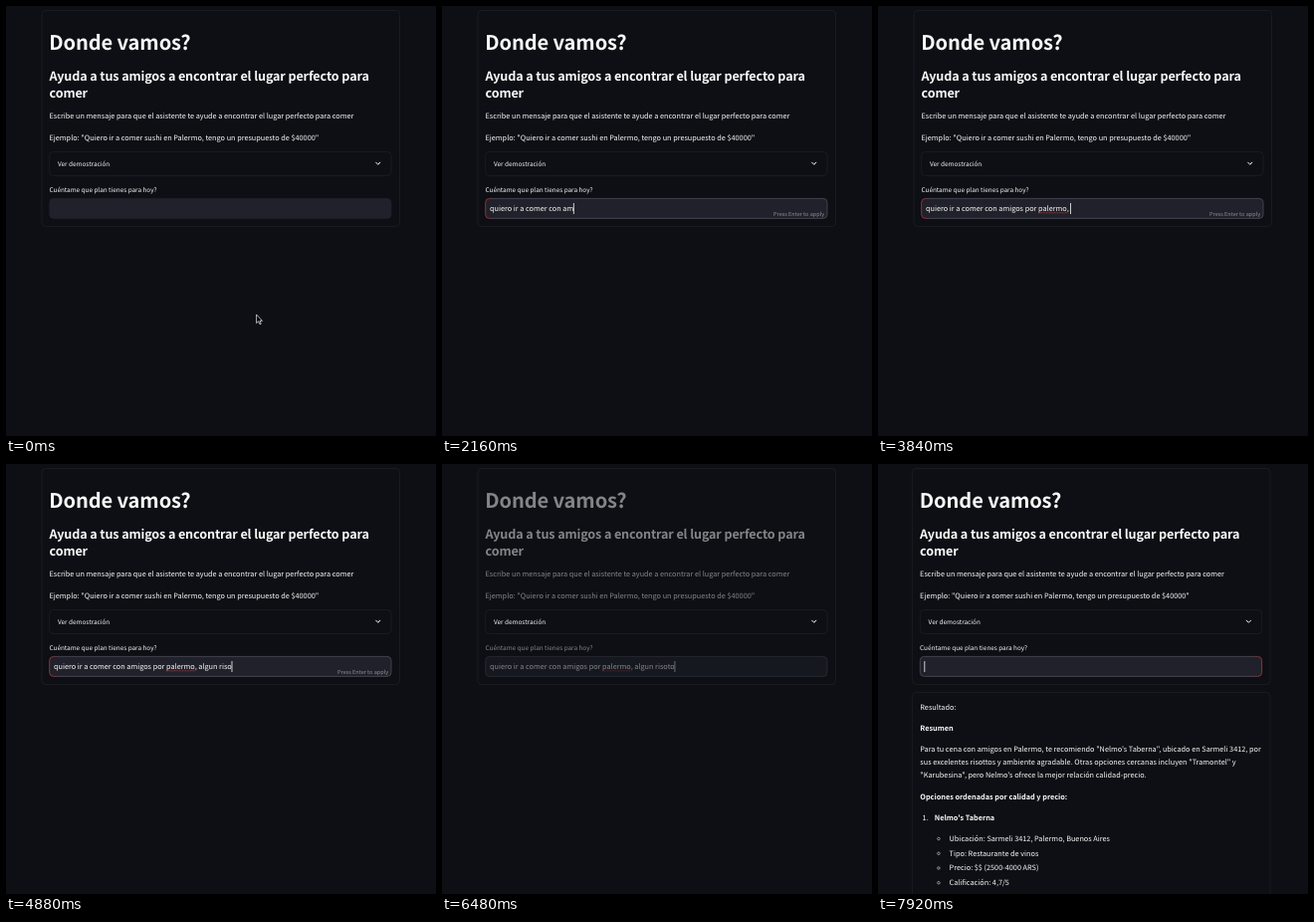
Write an HTML page that moves like this. It is 432 by 432 pixels and loops after 8000 ms.

```html
<!DOCTYPE html>
<html lang="es">
<head>
<meta charset="utf-8">
<title>Donde vamos?</title>
<style>
  html, body { margin: 0; width: 100%; height: 100%; overflow: hidden; background: #0d0f14; }
  svg { display: block; width: 432px; height: 432px; }
  text {
    font: 7.31px "Noto Sans CJK JP", "Noto Sans CJK SC", "Noto Sans CJK", "Noto Sans", sans-serif;
    fill: #fafafa; white-space: pre; text-rendering: geometricPrecision;
  }
  .h1 { font-size: 20.1px; font-weight: 700; letter-spacing: -.1px; }
  .h2 { font-size: 12.6px; font-weight: 700; letter-spacing: -.13px; }
  .label { font-size: 6.4px; }
  .bold { font-weight: 700; }
  .hint { font-size: 5.5px; fill: #8f9096; text-anchor: end; }
  .panel { fill: none; stroke: #1d1f25; stroke-width: .8; }
</style>
</head>
<body>
<svg viewBox="0 0 432 432">
  <defs>
    <linearGradient id="redLeft">
      <stop stop-color="#b5333b"/><stop offset=".03" stop-color="#4b4c58"/>
    </linearGradient>
    <linearGradient id="redRight">
      <stop offset=".97" stop-color="#4b4c58"/><stop offset="1" stop-color="#b5333b"/>
    </linearGradient>
  </defs>
  <g id="page">
    <rect class="panel" x="36" y="4.5" width="359.5" height="217" rx="4"/>
    <g id="content">
      <text class="h1" x="43.2" y="44">Donde vamos?</text>
      <text class="h2" x="43.5" y="75.2">Ayuda a tus amigos a encontrar el lugar perfecto para</text>
      <text class="h2" x="43.5" y="92.4">comer</text>
      <text x="43.5" y="113.4">Escribe un mensaje para que el asistente te ayude a encontrar el lugar perfecto para comer</text>
      <text x="43.5" y="134.6">Ejemplo: "Quiero ir a comer sushi en Palermo, tengo un presupuesto de $40000"</text>
      <text class="label" x="43.5" y="187.3">Cuéntame que plan tienes para hoy?</text>
      <rect id="field" x="43.7" y="193.4" width="343.3" height="20" rx="4" fill="#20212a" stroke-width=".8"/>
      <text id="typed" x="48" y="206"></text>
      <path id="misspelt" d="M161 207.8h29" stroke="#c0474c" stroke-width=".7" stroke-dasharray="1 .6"/>
      <path id="caret" d="M0 198v11" stroke="#fafafa" stroke-width=".8"/>
      <text id="hint" class="hint" x="384" y="210.6">Press Enter to apply</text>
    </g>
    <rect class="panel" x="43.7" y="146.5" width="343.3" height="24" rx="4"/>
    <text class="label" x="52" y="161">Ver demostración</text>
    <path d="M371.4 156.9l2.4 2.4 2.4-2.4" fill="none" stroke="#fafafa" stroke-width="1"/>
    <g id="result">
      <rect class="panel" x="36" y="229.5" width="359.5" height="230" rx="4"/>
      <text x="43.7" y="246.6">Resultado:</text>
      <text class="bold" x="43.7" y="268">Resumen</text>
      <text x="43.7" y="289.2">Para tu cena con amigos en Palermo, te recomiendo "Nelmo's Taberna", ubicado en Sarmeli 3412, por</text>
      <text x="43.7" y="302.3">sus excelentes risottos y ambiente agradable. Otras opciones cercanas incluyen "Tramontel" y</text>
      <text x="43.7" y="315.4">"Karubesina", pero Nelmo's ofrece la mejor relación calidad-precio.</text>
      <text class="bold" x="43.7" y="336.8">Opciones ordenadas por calidad y precio:</text>
      <text x="46" y="358">1.</text>
      <text class="bold" x="58.2" y="358">Nelmo's Taberna</text>
    </g>
  </g>
  <path id="pointer" d="M251.6 310v8.6l2-1.8 1.4 3 1.3-.6-1.4-2.9h2.6z" fill="#000" stroke="#fff" stroke-width=".7"/>
</svg>
<script>
const $ = id => document.getElementById(id);
const show = (id, on) => $(id).setAttribute("visibility", on ? "visible" : "hidden");
const LOOP = 8000, FOCUS = 240, FIRST_KEY = 480, ENTER = 5440, DONE = 6920;
const message = "quiero ir a comer con amigos por palermo, algun risoto";

// [time, characters typed], linear in between
const keys = [[400, 0], [480, 1], [960, 6], [1120, 6], [1440, 14], [1600, 15], [2160, 24],
  [2400, 27], [2480, 28], [3200, 40], [3600, 40], [3680, 41], [3760, 42], [4080, 42], [5040, 54]];

const details = ["Ubicación: Sarmeli 3412, Palermo, Buenos Aires", "Tipo: Restaurante de vinos",
  "Precio: $$ (2500-4000 ARS)", "Calificación: 4,7/5"];
$("result").insertAdjacentHTML("beforeend", details.map((line, i) => {
  const y = 378.9 + i * 14.75;
  return `<circle cx="62.3" cy="${y - 2.4}" r="1.3" fill="none" stroke="#fafafa" stroke-width=".5"/>
    <text x="73" y="${y}">${line}</text>`;
}).join(""));

function typedCount(t) {
  const i = keys.findIndex(k => k[0] > t);
  if (i < 0) return message.length;
  if (i === 0) return 0;
  const [[t0, n0], [t1, n1]] = [keys[i - 1], keys[i]];
  return Math.floor(n0 + (n1 - n0) * (t - t0) / (t1 - t0) + 1e-6);
}

function draw(t) {
  const done = t >= DONE;
  const fade = done ? 0 : Math.min(1, Math.max(0, (t - 6010) / 630));
  const blinkOff = t >= 3360 && t < 3680 || t >= 7200 && t < 7600;

  $("page").setAttribute("transform", `translate(${done ? -1.4 : 0})`);
  $("content").setAttribute("opacity", 1 - .67 * fade);
  $("typed").textContent = done ? "" : message.slice(0, typedCount(t));
  $("caret").setAttribute("transform", `translate(${48.2 + $("typed").getComputedTextLength()})`);
  $("field").setAttribute("stroke", done ? "url(#redRight)" : t < FOCUS ? "#20212a" : fade ? "#4b4c58" : "url(#redLeft)");
  show("caret", t >= FOCUS && !blinkOff);
  show("pointer", t < FIRST_KEY);
  show("hint", t >= FIRST_KEY && t < ENTER);
  show("misspelt", t >= 3680 && !done);
  show("result", done);
}

function tick() {
  draw(performance.now() % LOOP);
  requestAnimationFrame(tick);
}
tick();
</script>
</body>
</html>
```
